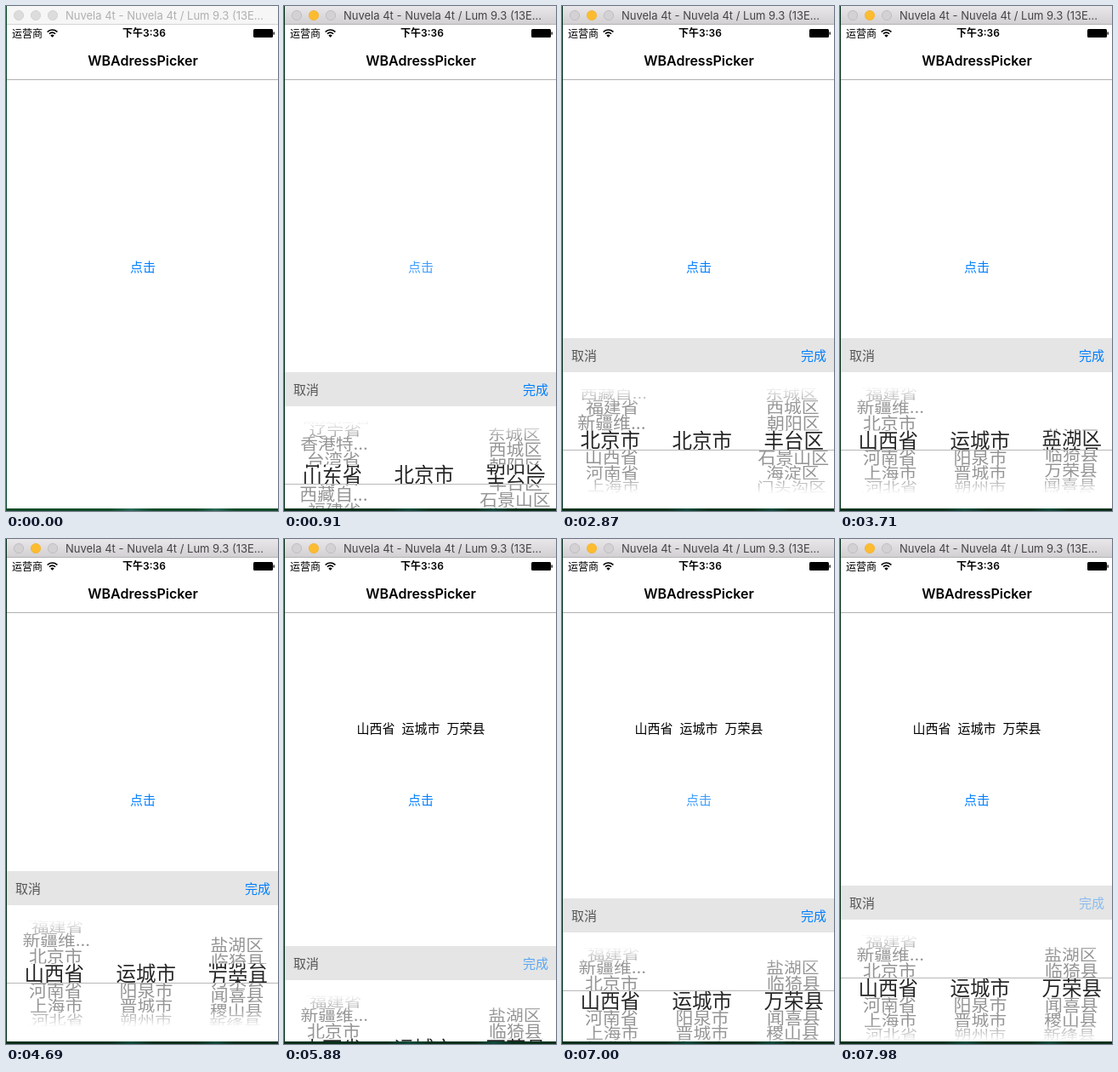
Recreate the animation shown at these times as an HTML page with a canvas. Size 320x593 px, loop 8 s.

```html
<!DOCTYPE html>
<html lang="zh">
<head>
<meta charset="utf-8">
<title>WBAdressPicker</title>
<style>
  html, body { margin: 0; width: 100%; height: 100%; overflow: hidden; background: #fff; }
  canvas { display: block; }
</style>
</head>
<body>
<canvas id="stage" width="320" height="593"></canvas>
<script>
const ctx = document.getElementById('stage').getContext('2d');
const LOOP = 8000, STEP = 70;
const CJK = '"Noto Sans CJK SC", "Noto Sans CJK", sans-serif';
const LATIN = 'Inter, "Noto Sans CJK SC", "Noto Sans CJK", sans-serif';
const BLUE = '#007fff';

const provinces = ('浙江省 江苏省 安徽省 江西省 湖北省 湖南省 广东省 海南省 重庆市 四川省 贵州省 云南省 ' +
  '陕西省 甘肃省 青海省 吉林省 天津市 黑龙江省 辽宁省 香港特... 台湾省 山东省 西藏自... 福建省 ' +
  '新疆维... 北京市 山西省 河南省 上海市 河北省 澳门特...').split(' ');
const beijing = {
  cities: ['北京市'],
  areas: '东城区 西城区 朝阳区 丰台区 石景山区 海淀区 门头沟区 房山区'.split(' ')
};
const shanxi = {
  cities: '运城市 阳泉市 晋城市 朔州市 忻州市'.split(' '),
  areas: '盐湖区 临猗县 万荣县 闻喜县 稷山县 新绛县 垣曲县 平陆县'.split(' ')
};

// Timing
const SHOW = [702, 6783], HIDE = [5740, 7919];
const SLIDE = 301, RELOAD = 3430;

const ramp = (t, a, b) => Math.min(1, Math.max(0, (t - a) / (b - a)));
const spin = (t, start) => 1 - (1 - ramp(t, start, start + 462)) ** 3;
const settle = (t, a, b) => 1 - (1 - ramp(t, a, b)) ** 2;

// cubic-bezier(.42, 0, .58, 1)
function slide(t, start) {
  const x = ramp(t, start, start + SLIDE);
  let lo = 0, hi = 1;
  for (let i = 0; i < 24; i++) {
    const s = (lo + hi) / 2, r = 1 - s;
    if (1.26 * s * r * r + 1.74 * s * s * r + s * s * s < x) lo = s; else hi = s;
  }
  return lo * lo * (3 - 2 * lo);
}

const pickerTop = t => Math.round(590 - 200 *
  (slide(t, SHOW[0]) - slide(t, HIDE[0]) + slide(t, SHOW[1]) - slide(t, HIDE[1])));

// Button opacity: dims on press, fades back after release
function tapAlpha(t, down, up) {
  if (t < down) return 1;
  return t < up ? 0.2 : 1 - 0.8 * (1 - ramp(t, up, up + 470)) ** 2;
}

// Drawing helpers
function rect(x, y, w, h, color) {
  ctx.fillStyle = color;
  ctx.fillRect(x, y, w, h);
}

function text(str, x, y, size, color, { align = 'center', family = CJK, weight = 400, mid = 0.38 } = {}) {
  ctx.font = `${weight} ${size}px ${family}`;
  ctx.textAlign = align;
  ctx.fillStyle = color;
  ctx.fillText(str, x, y + size * mid);
}

function gradient(x0, y0, x1, y1, ...stops) {
  const g = ctx.createLinearGradient(x0, y0, x1, y1);
  stops.forEach(([at, color]) => g.addColorStop(at, color));
  return g;
}

function faded(alpha, draw) {
  ctx.globalAlpha = alpha;
  draw();
  ctx.globalAlpha = 1;
}

function clipped(rects, draw) {
  ctx.save();
  ctx.beginPath();
  rects.forEach(r => ctx.rect(...r));
  ctx.clip();
  draw();
  ctx.restore();
}

function drawDesktop(active) {
  const dark = active ? '#06301a' : '#0b4a28';
  const glow = active ? '#0d4a3a' : '#2a6a58';
  rect(0, 0, 320, 593, dark);
  rect(0, 590, 320, 3, gradient(0, 0, 320, 0, [0, dark], [0.38, dark], [0.46, glow], [0.54, dark],
    [0.7, dark], [0.77, glow], [0.84, dark], [1, dark]));
  rect(1, 0, 319, 590, '#fff');
}

function drawTitleBar(active) {
  const fill = active ? gradient(0, 0, 0, 21, [0, '#e9e7e9'], [1, '#d2d0d2']) : '#f6f6f6';
  rect(1, 0, 319, 21, fill);
  rect(1, 21, 319, 1, active ? '#b4b2b4' : '#d4d4d4');
  for (let i = 0; i < 3; i++) {
    const lit = active && i === 1;
    ctx.beginPath();
    ctx.arc(15 + 20 * i, 11, 5.6, 0, Math.PI * 2);
    ctx.fillStyle = lit ? '#fdbc2f' : active ? '#d3d1d3' : '#dcdcdc';
    ctx.fill();
    ctx.lineWidth = 0.8;
    ctx.strokeStyle = lit ? '#f0b030' : active ? '#bab8ba' : '#cfcfcf';
    ctx.stroke();
  }
  text('Nuvela 4t - Nuvela 4t / Lum 9.3 (13E...', 70, 11.5, 13, active ? '#464446' : '#b0b0b0',
    { align: 'left', family: LATIN, mid: 0.364 });
}

function drawStatusBar() {
  text('运营商', 7, 32, 12, '#000', { align: 'left' });
  text('下午3:36', 162.5, 32, 12, '#000', { family: LATIN, weight: 600, mid: 0.37 });

  ctx.strokeStyle = ctx.fillStyle = '#000';
  ctx.lineWidth = 1.7;
  [4.8, 8].forEach(r => {
    ctx.beginPath();
    ctx.arc(54.5, 36, r, -Math.PI * 0.76, -Math.PI * 0.24);
    ctx.stroke();
  });
  ctx.beginPath();
  ctx.moveTo(54.5, 36.8);
  ctx.arc(54.5, 36.8, 3, -Math.PI * 0.76, -Math.PI * 0.24);
  ctx.fill();

  ctx.beginPath();
  ctx.roundRect(291, 27, 23, 10, 1.5);
  ctx.fill();
  rect(314.5, 30.5, 1.3, 3.2, '#000');
}

function drawPage(t) {
  text('WBAdressPicker', 161, 64, 16, '#000', { family: LATIN, weight: 600, mid: 0.364 });
  rect(1, 86, 319, 1, '#b2b2b2');
  if (t >= HIDE[0]) {
    ['山西省', '运城市', '万荣县'].forEach((name, i) => text(name, 108 + 53 * i, 222, 15, '#000'));
  }
  const alpha = t < 6720 ? tapAlpha(t, 700, SHOW[0]) : tapAlpha(t, 6720, SHOW[1]);
  faded(alpha, () => text('点击', 161, 306, 15, BLUE));
}

// Wheel geometry
const RADIUS = 74, TURN = 0.274, BAND = 11.5, REACH = 62, ZOOM = 23.5 / 21;

function drawRows(rows, pos, x, mid, size, zoom, color) {
  rows.forEach((name, i) => {
    const angle = (i - pos) * TURN;
    if (Math.abs(angle) > 1.2) return;
    const depth = Math.cos(angle);
    const near = 1 - 0.08 * (1 - depth);
    ctx.save();
    ctx.translate(160 + (x - 160) * near, mid + RADIUS * zoom * Math.sin(angle));
    ctx.scale(near, depth);
    text(name, 0, 0, size, color);
    ctx.restore();
  });
}

function drawWheel(rows, pos, x, lensX, mid) {
  const outside = [[1, mid - REACH, 319, REACH - BAND], [1, mid + BAND, 319, REACH - BAND]];
  clipped(outside, () => drawRows(rows, pos, x, mid, 21, 1, 'rgba(0,0,0,.42)'));
  clipped([[1, mid - BAND, 319, BAND * 2]],
    () => drawRows(rows, pos, lensX, mid, 23.5, ZOOM, '#262626'));
}

function drawPicker(t) {
  const top = pickerTop(t);
  if (top >= 590) return;
  const mid = top + 120;
  const region = t < RELOAD ? beijing : shanxi;

  const provincePos = 25 * spin(t, SHOW[0]) + 0.75 * ramp(t, 2862, 3010) + 0.25 * settle(t, 3340, 3500);
  const areaPos = 3 * spin(t, SHOW[0]) - 3 * spin(t, RELOAD) +
    1.7 * ramp(t, 4430, 4690) + 0.3 * settle(t, 4930, 5110);

  clipped([[1, top, 319, 590 - top]], () => {
    rect(1, top, 319, 200, '#fff');
    drawWheel(provinces, provincePos, 58, 56.7, mid);
    drawWheel(region.cities, 0, 165, 164.7, mid);
    drawWheel(region.areas, areaPos, 272.7, 272.7, mid);

    const clear = 'rgba(255,255,255,0)', veil = 'rgba(255,255,255,.95)';
    rect(1, mid - REACH, 319, 20, gradient(0, mid - REACH, 0, mid - REACH + 20, [0, veil], [1, clear]));
    rect(1, mid + REACH - 20, 319, 20, gradient(0, mid + REACH - 20, 0, mid + REACH, [0, clear], [1, veil]));

    // Only one hairline survives the half-size screen
    const upper = t > SHOW[1] && top > 390;
    rect(1, top + (upper ? 108 : 131), 319, 1, '#b8b8b8');

    rect(1, top, 319, 40, '#e5e5e5');
    text('取消', 11, top + 20, 15, '#555', { align: 'left' });
    const alpha = t < SHOW[1] ? tapAlpha(t, 5670, HIDE[0]) : tapAlpha(t, 7840, HIDE[1]);
    faded(alpha, () => text('完成', 311, top + 20, 15, BLUE, { align: 'right' }));
  });
}

function render(now) {
  const t = Math.floor((now % LOOP) / STEP) * STEP;
  const active = t >= 560;
  drawDesktop(active);
  drawTitleBar(active);
  drawStatusBar();
  drawPage(t);
  drawPicker(t);
}

let start;
function tick(now) {
  start ??= now;
  render(now - start);
  requestAnimationFrame(tick);
}
render(0);
requestAnimationFrame(tick);
</script>
</body>
</html>
```
